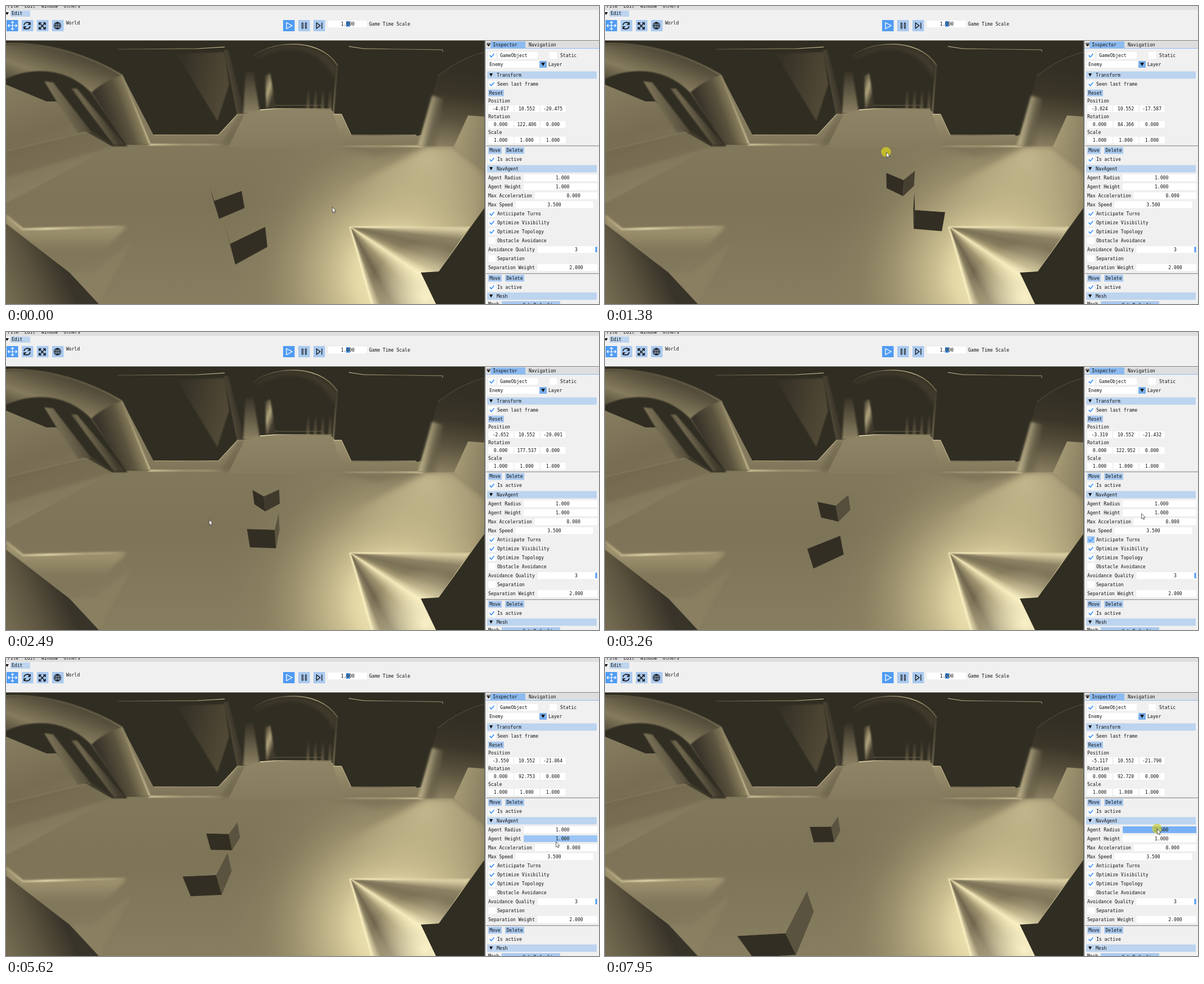
These frames come from a looping animation (1055x531 px, 8 s). An HTML page with a canvas:

```html
<!DOCTYPE html>
<html>
<head>
<meta charset="utf-8">
<style>
  html, body { margin: 0; width: 100%; height: 100%; overflow: hidden; background: #f0f0f0; }
  canvas { display: block; }
</style>
</head>
<body>
<canvas id="stage" width="1055" height="531"></canvas>
<script>
const LOOP = 8000;
const stage = document.getElementById('stage').getContext('2d');
const backdrop = document.createElement('canvas');
backdrop.width = 1055;
backdrop.height = 531;
let g = backdrop.getContext('2d');

// ---------- drawing helpers ----------
function shades(gradient, colors) {
  colors.forEach((c, i) => gradient.addColorStop(i / (colors.length - 1), c));
  return gradient;
}
const lin = (x0, y0, x1, y1, ...colors) => shades(g.createLinearGradient(x0, y0, x1, y1), colors);
const rad = (x, y, r, ...colors) => shades(g.createRadialGradient(x, y, 0, x, y, r), colors);

function fill(path, paint, blur = 0) {
  g.filter = blur ? `blur(${blur}px)` : 'none';
  g.fillStyle = paint;
  g.fill(new Path2D(path));
  g.filter = 'none';
}
function line(path, paint, width = 1, blur = 0) {
  g.filter = blur ? `blur(${blur}px)` : 'none';
  g.strokeStyle = paint;
  g.lineWidth = width;
  g.stroke(new Path2D(path));
  g.filter = 'none';
}
function box(x, y, w, h, color) {
  g.fillStyle = color;
  g.fillRect(x, y, w, h);
}
function text(str, x, y, align = 'left') {
  g.font = '8.1px "DejaVu Sans Mono", monospace';
  g.textBaseline = 'middle';
  g.textAlign = align;
  g.fillStyle = '#111';
  g.fillText(str, x, y + 0.5);
}

// ---------- room ----------
const DARK = '#302d22', CLEAR = 'rgba(251,240,192,0)';

function drawFloor() {
  box(0, 62, 851, 469, lin(0, 180, 0, 531, '#857b5e', '#7d7357', '#877d5f'));
  box(0, 62, 851, 469, rad(700, 480, 330, '#fff8cb', '#e2d6a4', 'rgba(190,178,134,.65)', 'rgba(150,140,105,.25)', 'rgba(130,120,91,0)'));
  fill('M748 250L600 330L640 395H825L851 340V300L797 250Z',
    rad(750, 270, 175, 'rgba(216,204,157,.7)', 'rgba(200,188,143,.45)', 'rgba(180,168,126,0)'), 6);
  fill('M585 250H745L660 268Z', 'rgba(112,103,78,.45)', 4);
}

function drawHall() {
  fill('M0 62H851V200L733 231H612L582 192H412L378 229H262L207 123L0 100Z', DARK);
  // left opening
  fill('M303 85L389 82L397 140L376 205Z', lin(310, 110, 395, 130, '#353126', '#514936'), 1);
  line('M198 77L340 76L389 73', lin(198, 0, 389, 0, '#5a5340', '#8b8164', '#e2d7ab'), 1.1);
  fill('M388 78L396 78L425 192L411 194Z', lin(390, 135, 412, 130, '#5b533e', '#353126'), .7);
  fill('M262 229H378L412 192H428L398 248H255Z', lin(0, 200, 0, 248, '#92876a', '#7d7358'));
  line('M264 229.5H378L412 193', lin(264, 0, 412, 0, '#b5a97f', '#9d926e', '#d5c99d'), 1.1, .5);
  line('M253 247H390', lin(253, 0, 390, 0, '#f3e8b8', '#a69a73', CLEAR), 2.3, 1);
  fill('M412 193H430L404 247H383Z', 'rgba(103,95,71,.55)', 3);
  // corridor
  fill('M426 118L440 116L452 192H422Z', lin(0, 118, 0, 192, '#393428', '#8c8163'), 1.5);
  fill('M461 124L470 120L480 182H463Z', lin(458, 140, 480, 148, '#4f4836', '#b3a77f', '#403a2d'), 1.5);
  fill('M440 98C462 68 540 50 590 106L584 130C560 75 500 60 440 98Z', 'rgba(92,84,62,.35)', 3);
  line('M440 90C462 66 555 50 590 106', lin(440, 0, 590, 0, '#3f392c', '#6b634b', '#c2b68c', '#6b634b'), 1.6, .7);
  line('M589 106L582 194', lin(0, 104, 0, 194, '#454032', '#a59a74'), 1.8, .8);
  for (let x = 536; x < 580; x += 13) fill(`M${x} 150H${x + 4}V184H${x - 2}Z`, lin(0, 150, 0, 184, '#363227', '#5d553f'), 1);
  fill('M425 192L455 184H578L586 193L614 231V252H395Z', lin(0, 184, 0, 250, '#8f8466', '#857b5e'), .5);
  line('M452 185L480 183H580', lin(452, 0, 580, 0, '#f0e5b8', '#a99d78', '#7c7257'), 1.5, .7);
  line('M478 177H562', '#6a624a', 1, .6);
  // right opening
  line('M610 72L636 76L777 78V82', lin(610, 0, 777, 0, '#d9cda1', '#7b7157', '#a19673'), 1);
  fill('M582 192H596L614 231H730L734 248H600Z', lin(0, 195, 0, 248, '#9a8f6d', '#82785b'));
  line('M583 193H597L614 230H730', lin(583, 0, 730, 0, '#d5c99d', '#a59972', '#e4d8aa'), 1.2, .5);
  line('M595 250H742', lin(595, 0, 742, 0, CLEAR, '#a99d77', '#f0e5b6'), 2, 1);
  // right arch
  fill('M768 125C795 103 820 90 851 82V198H822L797 250H733Z', lin(785, 105, 765, 250, '#332f24', '#3a3528', '#5b533e', '#8b8062'), .6);
  fill('M758 160L778 165L768 250H733Z', lin(742, 205, 776, 212, '#c9bd93', '#706850', 'rgba(92,84,63,0)'), 2);
  line('M768 125C795 103 820 90 851 82', '#544d3a', 1.2, .5);
  fill('M822 195L851 197V296L797 250Z', lin(800, 230, 851, 240, '#a69b75', '#8a8062'));
}

function drawLeftArch() {
  fill('M0 66C80 62 155 90 207 123L257 247H185L0 352Z', lin(120, 66, 85, 165, '#3f392c', '#5e5641', '#857b5d', '#4d4635'));
  fill('M0 130C50 106 112 112 152 155L216 250H188L0 215Z', DARK, .8);
  fill('M0 140L72 170H90L132 218L188 250L0 352Z', lin(0, 150, 60, 320, '#857b5e', '#776d53', '#877d5f'));
  fill('M0 256L150 222L190 250L0 305Z', 'rgba(105,97,74,.4)', 2);
  line('M0 258L150 223', '#928768', 1.1, .8);
  fill('M68 134L84 136L150 222L128 226L90 170Z', lin(85, 180, 125, 162, '#81775b', '#4f4837'), .8);
  fill('M116 147H126L212 248H192Z', lin(135, 210, 172, 190, '#38342a', '#70674e', '#403b2d'), 1);
  fill('M152 154C170 138 190 128 207 123L257 247H214Z', lin(178, 200, 240, 178, '#39342a', '#5b533e', '#a3986f'), .8);
  line('M0 69C80 65 155 92 206 123', lin(0, 69, 206, 123, '#4c4534', '#6b634b', '#91876a'), 1.5, 1);
  line('M206 123L256 246', lin(206, 123, 256, 246, '#91876a', '#c2b68c', '#f3e8b9'), 1.8, .9);
}

function drawForeground() {
  // lower left
  fill('M0 372L30 398L215 393L170 440L113 475L0 388Z', lin(0, 395, 0, 470, '#a09570', '#82785b', 'rgba(125,115,87,0)'), 3);
  line('M0 374L30 398L215 393', lin(0, 0, 215, 0, '#a99d76', '#fff5c6', '#b9ad83', CLEAR), 3, 1.4);
  fill('M113 475L155 474L225 420L165 531Z', 'rgba(150,140,106,.3)', 3);
  fill('M0 388L113 475L165 531H0Z', lin(0, 510, 100, 465, '#736a51', '#5b533e', '#39342a'));
  // lower right: two walls whose shading fans out from their shared corner
  const fan = g.createConicGradient(0, 612, 393);
  ['#e9deb0', '#8d8264', '#7b7156', '#857b5d', '#a69a73', '#f3e8b9', '#c8bc92', '#a0956f', '#8a8062', '#6f664e', '#8a8062', '#fff5c6']
    .forEach((c, i, all) => fan.addColorStop(i / (all.length - 1) * 75 / 360, c));
  const walls = 'M612 393H825L770 473H738L765 531H650Z';
  fill(walls, fan);
  fill(walls, rad(745, 520, 100, 'rgba(255,247,205,.9)', 'rgba(255,247,205,.45)', CLEAR));
  line('M822 394H612L651 531', lin(640, 393, 822, 393, '#fff4c3', '#b8ac83'), 2, 1);
  fill('M851 360V531H765L738 475L770 473Z', DARK);
}

// ---------- editor chrome ----------
const PALE = '#a9c9ef', BLUE = '#4f9bf3', HEADER = '#bcd4ef', HOVER = '#9cc5f5', HELD = '#78b0f5';

function drawToolbar() {
  box(0, 0, 1055, 62, '#f0f0f0');
  box(0, 0, 1055, 7, '#dfdfdf');
  ['File', 'Edit', 'Window', 'Others'].reduce((x, s) => (text(s, x, 0), x + s.length * 4.9 + 10.4), 3);
  box(8, 8, 35, 11, HEADER);
  fill('M-1 11H5L2 16Z', '#111');
  text('Edit', 10, 13.5);
  [1, 28, 55, 82, 493, 520, 547].forEach(x => box(x, 25, 20.5, 20, x === 1 || x === 493 ? BLUE : PALE));
  line('M4 35H19M11.5 28V42M9 30L11.5 27.5L14 30M9 40L11.5 42.5L14 40M6 32.5L3.5 35L6 37.5M17 32.5L19.5 35L17 37.5', '#fff', 1.2);
  line('M32 34A6 6 0 0 1 43 32M43 29V33H39M43 36A6 6 0 0 1 32 38M32 41V37H36', '#111', 1.6);
  line('M59 34V30H63M66 30H70V34M70 37V41H66M63 41H59V37M60 31L69 40M69 31L60 40', '#111', 1.5);
  line('M85.5 35A6 6 0 0 1 97.5 35A6 6 0 0 1 85.5 35M86 35H97M91.5 29V41M91.5 29C87 33 87 37 91.5 41C96 37 96 33 91.5 29', '#111', 1.1);
  text('World', 107, 30);
  line('M499 29.5L509 35L499 40.5Z', '#fff', 1.3);
  line('M526.5 30V40H528.5V30ZM532.5 30V40H534.5V30Z', '#111', 1);
  line('M552.5 30L559 35L552.5 40ZM562 29.5V40.5', '#111', 1.3);
  box(573, 26, 69, 12, '#fff');
  box(605, 27, 7, 10, '#4f9bea');
  text('1.000', 608, 32, 'center');
  text('Game Time Scale', 646, 32);
  box(0, 61, 1055, 1, '#77756d');
}

function header(label, y) {
  box(856, y - 6.5, 195, 13, HEADER);
  fill(`M860 ${y - 3}H866L863 ${y + 3}Z`, '#111');
  text(label, 873, y);
}
function button(label, x, y, w) {
  box(x, y - 6, w, 12, PALE);
  text(label, x + w / 2, y, 'center');
}
function check(label, y, on, back = '#fff') {
  box(858, y - 6, 13, 12, back);
  if (on) line(`M860.5 ${y}L863.5 ${y + 3}L868.5 ${y - 3}`, '#4296fa', 1.8);
  text(label, 874, y);
}
function vector(y, values) {
  values.forEach((v, i) => {
    const x = 858 + 46.5 * i;
    box(x, y - 6, 44.5, 12, '#fff');
    text(v.toFixed(3), x + 22, y, 'center');
  });
}
// Value field to the right of its label, cut off by the panel edge.
const fieldLeft = label => 858 + label.length * 4.87 + 4.7;
function field(label, y, value, back = '#fff') {
  const x = fieldLeft(label), w = 138;
  text(label, 858, y);
  box(x, y - 6, Math.min(w, 1052 - x), 12, back);
  text(value, x + w / 2, y, 'center');
}

function drawInspector() {
  box(851, 62, 204, 469, '#f0f0f0');
  box(851, 62, 2, 469, '#6f6f6f');
  box(853, 63, 202, 12, '#dedede');
  box(862, 63, 62, 12, '#8dbbf0');
  box(853, 75, 202, 1, '#8dbbf0');
  fill('M855 68H862L858.5 72ZM855 66H862V67H855Z', '#111');
  text('Inspector', 866, 69);
  text('Navigation', 930, 69);
  check('', 88, true);
  box(875, 82, 71, 12, '#fff');
  text('GameObject', 879, 88);
  box(967, 82, 13, 12, '#fff');
  text('Static', 986, 88);
  box(857, 98, 92, 12, '#fff');
  text('Enemy', 860, 104);
  box(949, 98, 13, 12, '#78aeea');
  fill('M952 101H959L955.5 107Z', '#111');
  text('Layer', 965, 104);
  header('Transform', 123);
  check('Seen last frame', 139, true);
  button('Reset', 858, 155, 28);
  ['Position', 'Rotation', 'Scale'].forEach((s, i) => text(s, 858, 169 + 28 * i));
  vector(239, [1, 1, 1]);
  [257.5, 485].forEach(y => {
    box(854, y - 9, 201, 1.5, '#a2a2a2');
    button('Move', 858, y, 24);
    button('Delete', 888, y, 34);
    check('Is active', y + 16, true);
  });
  header('NavAgent', 290);
  ['Optimize Visibility', 'Optimize Topology', 'Obstacle Avoidance'].forEach((s, i) => check(s, 386 + 16 * i, i < 2));
  field('Avoidance Quality', 434, '3');
  box(1048.5, 429, 3, 10, BLUE);
  check('Separation', 450, false);
  field('Separation Weight', 466, '2.000');
  header('Mesh', 517);
  text('Mesh', 858, 531);
  box(882, 526, 104, 5, PALE);
  text('CubeDefault', 946, 533, 'center');
}

// ---------- motion ----------
const linear = u => u;
const cubicIn = u => u ** 3;
const cubicOut = u => 1 - (1 - u) ** 3;
const smooth = u => u * u * (3 - 2 * u);
const during = (t, a, b) => t >= a && t < b;

// Each stop is reached at `at`, held until `leave`, then left with `ease`.
function follow(stops, t, key) {
  const i = stops.findLastIndex(s => s.at <= t);
  const from = stops[i], to = stops[i + 1], leave = from.leave || from.at;
  if (!to || t <= leave) return from[key];
  const u = (from.ease || linear)((t - leave) / (to.at - leave));
  return from[key].map((v, k) => v + (to[key][k] - v) * u);
}

// Ground position x (away from the viewer), z (to the right) and heading in degrees.
const AGENTS = [
  { at: 0, near: [-4.017, -20.475, 122.406], far: [-2.31, -21.75, 35], ease: cubicIn },
  { at: 1380, near: [-3.024, -17.587, 84.366], far: [-.94, -18.54, 53], ease: smooth },
  { at: 2490, near: [-2.651, -20.089, 177.608], far: [-.09, -20.46, 47] },
  { at: 3260, near: [-3.319, -21.431, 122.999], far: [-.98, -21.85, 72], ease: cubicOut },
  { at: 5200, leave: 6950, near: [-3.55, -21.864, 92.753], far: [-1.28, -22.3, 88] },
  { at: 7950, near: [-5.117, -21.79, 92.72], far: [-.7, -22.4, 91] }
];
const MOUSE = [
  { at: 0, leave: 250, pos: [580, 358] },
  { at: 1250, leave: 1400, pos: [500, 260] },
  { at: 2050, leave: 2500, pos: [361, 334] },
  { at: 3170, pos: [866, 367] },
  { at: 3260, pos: [954, 323] },
  { at: 4250, leave: 4430, pos: [978, 347] },
  { at: 4750, leave: 6400, pos: [978, 327] },
  { at: 6500, leave: 6960, pos: [971, 304] },
  { at: 7800, pos: [982, 304] }
];
const DRAG = 6960;

// Camera pitched down; `drop` is the distance below the cube tops.
function project(x, z, drop) {
  const depth = 8.34 + .891 * x + .453 * drop;
  return [515 + 270 * (z + 18.85) / depth, 138 + 1181 * (1 + drop / 3.5) / depth];
}

function drawCube([x, z, heading]) {
  const yaw = heading * Math.PI / 180;
  const ring = drop => [0, 1, 2, 3].map(k => {
    const a = yaw + (k + .5) * Math.PI / 2;
    return project(x + Math.sin(a) * .72, z + Math.cos(a) * .72, drop);
  });
  const top = ring(0), bottom = ring(.8);
  const outline = points => `M${points.map(p => p.join(' ')).join('L')}Z`;
  top.forEach((a, k) => {
    const n = (k + 1) % 4, b = top[n], c = bottom[k];
    const facing = (b[0] - a[0]) * (c[1] - a[1]) - (b[1] - a[1]) * (c[0] - a[0]) > 0;
    if (!facing) return;
    const lit = Math.max(0, (Math.cos(yaw + (k + 1) * Math.PI / 2) - .6) / .4);
    fill(outline([a, b, bottom[n], c]), `rgb(${50 + 40 * lit},${46 + 37 * lit},${35 + 28 * lit})`);
  });
  // The top is lit like the floor and blends into it.
  g.save();
  g.clip(new Path2D(outline(top)));
  g.drawImage(backdrop, 0, 0);
  g.restore();
}

function drawLiveFields(t, [x, z, yaw]) {
  vector(183, [x, 10.552, z]);
  vector(211, [0, yaw, 0]);
  const [mx, my] = follow(MOUSE, Math.max(0, t - 90), 'pos');
  const tint = (left, y) => mx > left && Math.abs(my - y) <= 6 ? HOVER : '#fff';
  const radius = 1 + 1.5 * Math.min(1, Math.max(0, (t - DRAG) / 840));
  const values = { 'Agent Radius': radius, 'Agent Height': 1, 'Max Acceleration': 8, 'Max Speed': 3.5 };
  Object.entries(values).forEach(([label, v], i) => {
    const y = 306 + 16 * i, held = i === 0 && t >= DRAG;
    field(label, y, v.toFixed(3), held ? HELD : tint(fieldLeft(label), y));
  });
  check('Anticipate Turns', 370, true, tint(857, 370));
}

function drawCursor(t) {
  const [x, y] = follow(MOUSE, t, 'pos');
  if (during(t, 1290, 1430) || during(t, 2150, 2320) || t >= DRAG) {
    g.beginPath();
    g.arc(x, y, 8.7, 0, 7);
    g.fillStyle = t >= DRAG ? 'rgba(205,205,55,.72)' : 'rgba(200,192,42,.92)';
    g.fill();
  }
  const arrow = `M${x + .5} ${y + .5}v9.5l2.1-2l1.5 3.2l1.6-.7l-1.5-3.1h2.9Z`;
  fill(arrow, '#fff');
  line(arrow, '#222', .7);
}

drawFloor();
drawHall();
drawLeftArch();
drawForeground();
drawToolbar();
drawInspector();
g = stage;

function frame(now) {
  const t = now % LOOP;
  const near = follow(AGENTS, t, 'near');
  g.drawImage(backdrop, 0, 0);
  drawCube(follow(AGENTS, t, 'far'));
  drawCube(near);
  drawLiveFields(t, near);
  drawCursor(t);
  requestAnimationFrame(frame);
}
requestAnimationFrame(frame);
</script>
</body>
</html>
```
